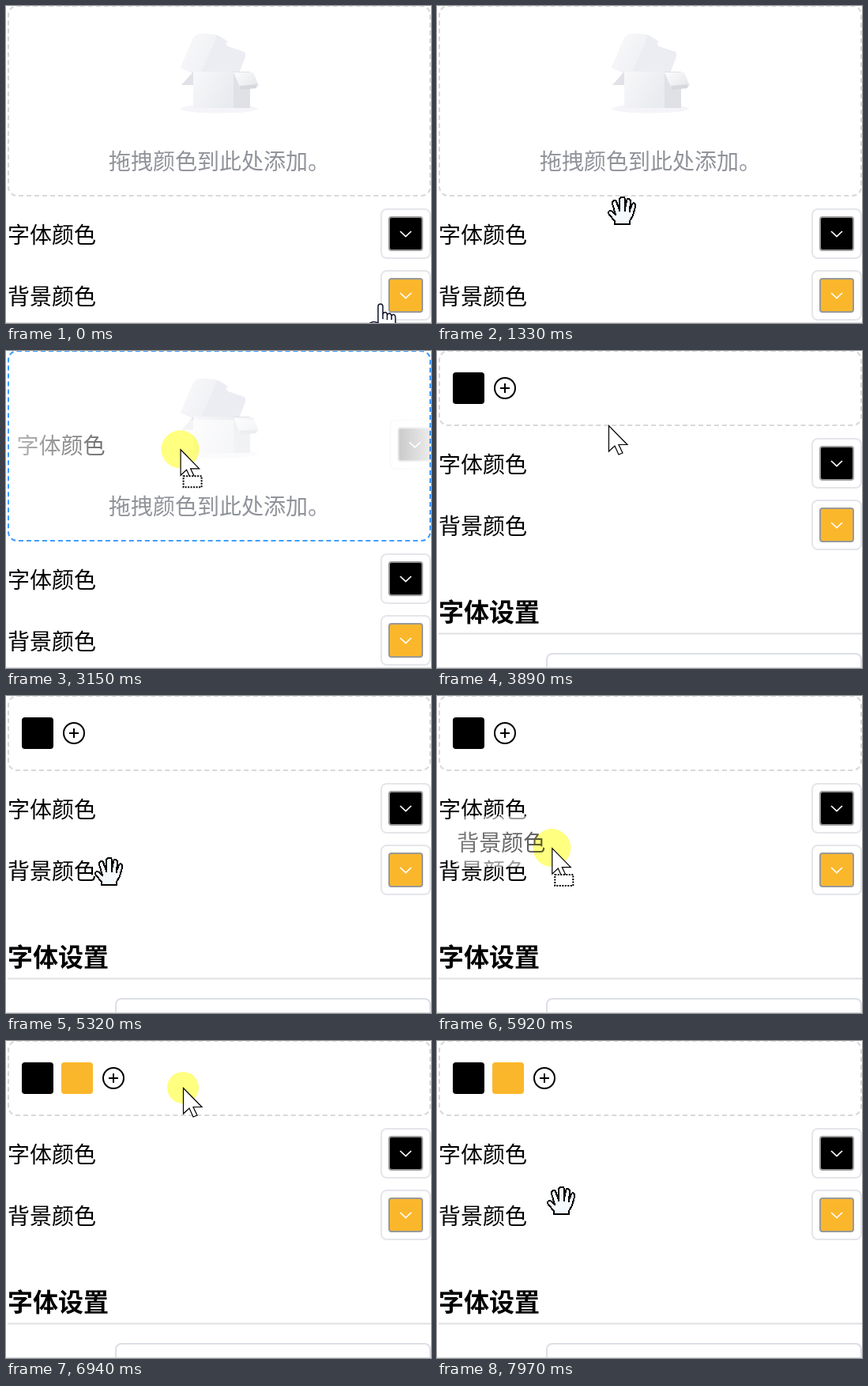
Recreate the animation shown at these times as an HTML page. Size 538 by 401 pixels, loop 8 s.

```html
<!DOCTYPE html>
<html lang="zh-CN">
<head>
<meta charset="utf-8">
<title>颜色拖拽</title>
<style>
html, body { margin: 0; width: 100%; height: 100%; overflow: hidden; background: #fff; }
#zone {
  position: absolute; left: 2px; top: -1px; width: 536px; height: 242px;
  box-sizing: border-box; border: 2px dashed #d9d9d9; border-radius: 12px;
}
svg { position: absolute; left: 0; top: 0; display: block; }
text { font: 28px "Noto Sans CJK SC", "Noto Sans CJK", sans-serif; }
</style>
</head>
<body>
<div id="zone"></div>
<svg id="stage" width="538" height="401" viewBox="0 0 538 401"></svg>
<script>
const YELLOW = '#fbb72c';
const $ = id => document.getElementById(id);

const row = (id, label, color) => `
  <g id="${id}">
    <text x="2" y="44">${label}</text>
    <rect x="475" y="1" width="62" height="62" rx="7" fill="#fff" stroke="#e4e6ea" stroke-width="2"/>
    <rect x="485" y="11" width="42" height="42" rx="3" fill="${color}" stroke="#999" stroke-width="2"/>
    <path d="M499 29l7 6.5 7-6.5" fill="none" stroke="#fff" stroke-width="1.7"/>
  </g>`;

const fade = (id, from, to, slope = 0) => `
  <linearGradient id="${id}" x2="1" y2="${slope}">
    <stop stop-color="${from}"/><stop offset="1" stop-color="${to}"/>
  </linearGradient>`;

const stops = [[0, .66], [.3, .55], [.6, .3], [.82, .2], [1, 0]]
  .map(([o, a]) => `<stop offset="${o}" stop-color="#fff" stop-opacity="${a}"/>`).join('');

$('stage').innerHTML = `
  <defs>
    ${row('row0', '字体颜色', '#000')}
    ${row('row1', '背景颜色', YELLOW)}
    ${fade('lidL', '#fafafb', '#eff0f4', .6)}
    ${fade('front', '#f8f8fa', '#e9ebef', .5)}
    ${fade('flap', '#fcfcfd', '#e6e7eb', .8)}
    <radialGradient id="glow" gradientUnits="userSpaceOnUse" r="340">${stops}</radialGradient>
    <mask id="veil" maskUnits="userSpaceOnUse" x="0" y="0" width="538" height="64">
      <rect width="538" height="64" fill="url(#glow)"/>
    </mask>
  </defs>
  <g id="empty">
    <ellipse cx="270" cy="130" rx="49" ry="5.5" fill="#f5f5f9"/>
    <path d="M221 78L236 43Q239 36 246 35L264 36Q270 37 281 45L279 50L302 58Q304 62 302 67L295 85H237Z" fill="#ebedf2"/>
    <path d="M221 78L236 43Q239 36 246 35L264 36Q268 37 265 43L247 84H237Z" fill="url(#lidL)"/>
    <path d="M278 45L302 58L281 51Z" fill="#fff"/>
    <path d="M222 100L237 83V100Z" fill="#e1e2e8"/>
    <path d="M237 83H289V129H237Z" fill="url(#front)"/>
    <path d="M288 83H309V129H288Z" fill="#dfe1e6"/>
    <path d="M288 84H313L320 101L297 105Z" fill="url(#flap)"/>
    <path d="M296 101L318 99L317 104L297 106Z" fill="#d6d8dd"/>
    <text x="130" y="207" fill="#909399">拖拽颜色到此处添加。</text>
  </g>
  <g id="colors">
    <rect x="20" y="27" width="40" height="40" rx="4"/>
    <rect id="second" x="70" y="27" width="40" height="40" rx="4" fill="${YELLOW}"/>
    <g id="plus" fill="none" stroke="#000" stroke-width="2">
      <circle r="13"/><path d="M-6 0H6M0-6V6"/>
    </g>
  </g>
  <g id="list">
    <use href="#row0" y="256"/>
    <use href="#row1" y="334"/>
    <text x="2" y="488" style="font-size:32px;font-weight:700">字体设置</text>
    <path d="M2 503.5H538" stroke="#dfe0e4" stroke-width="2"/>
    <rect x="139" y="529" width="398" height="60" rx="7" fill="#fff" stroke="#dcdfe6" stroke-width="2"/>
  </g>
  <path d="M0 400.5H538" stroke="#d9d9dc"/>
  <g id="ghost"><g mask="url(#veil)">
    <rect width="538" height="64" fill="#fff"/><use id="ghostRow"/>
  </g></g>
  <g id="cursor">
    <circle id="spot" fill="#ffff80" style="mix-blend-mode:multiply"/>
    <g id="arrow">
      <path d="M.5 .5V33L8 26L13 37L18 35L13 24.5H24Z" fill="#fff" stroke="#000" stroke-width="1.2"/>
      <rect id="parcel" x="4" y="34" width="23" height="14" fill="#fff" stroke="#000" stroke-width="2" stroke-dasharray="2 1.5"/>
    </g>
    <path id="hand" fill="#f3f9fd" stroke="#000" stroke-width="2" stroke-linejoin="round" shape-rendering="crispEdges"
      d="M-9 17V13L-16 5Q-18 1 -15 0Q-12 0 -8 5L-12 -9Q-12 -13 -9 -13Q-7 -13 -6 -9L-3 -1V-14Q-3 -17 0 -17H2Q4 -17 4 -14V-2L6 -13Q7 -16 9 -15Q11 -14 11 -11L10 -1L13 -8Q14 -11 16 -9Q18 -8 17 -5L14 6L10 13V17Z
      M-3 -1V1M4 -2V1M10 -1V2"/>
    <path id="finger" fill="#fff" stroke="#10102c" stroke-width="1.5"
      d="M-3 24V3Q-3 0 0 0Q3 0 3 3V19M3 13Q4 10 6.500 10.500Q8.500 11 8.500 14V20M8.500 14Q10 11 12 12Q14 13 14 15V20M14 15Q16 12 18 14Q19 15 19 18V30H-4L-13 24Q-9 21 -3 24"/>
    <g id="banned" fill="none" stroke="#6e6c00" stroke-width="6">
      <circle r="17"/><path d="M-12-12L12 12"/>
    </g>
  </g>`;

// Pointer path: time, x, y
const path = [
  [0, 474, 377], [70, 474, 377], [350, 444, 338], [630, 384, 272], [840, 336, 256],
  [910, 336, 256], [1120, 280, 252], [1330, 234, 259], [1610, 209, 294], [1740, 209, 283],
  [2200, 214, 273], [2500, 222, 262], [2560, 226, 243], [2630, 229, 233], [3000, 223, 148],
  [3360, 217, 94], [4620, 217, 94], [5000, 182, 158], [5320, 130, 222], [5390, 122, 229],
  [5520, 122, 227], [5900, 148, 188], [6130, 178, 143], [6270, 199, 106], [6340, 203, 94],
  [6480, 214, 72], [6680, 224, 59], [7340, 224, 59], [7650, 190, 138], [7970, 157, 202], [8000, 157, 202]
];
const drags = [
  { start: 1740, drop: 3490, rest: 3890, enter: 2560, x: 209, y: 294, top: 256 },
  { start: 5520, drop: 6940, rest: 7340, enter: 6400, x: 122, y: 228, top: 188 }
];
const beats = [0, 1740, 2560, 3490, 3890, 4620, 5520, 6340, 6940, 7340];

const slope = (i, k) => (path[i + 1][k] - path[i][k]) / (path[i + 1][0] - path[i][0]);

// Monotone tangent, flat at turns and rests
function tangent(i, k) {
  if (i === 0 || i === path.length - 1) return 0;
  const a = slope(i - 1, k), b = slope(i, k);
  return a * b > 0 ? 2 * a * b / (a + b) : 0;
}

function at(t, k) {
  let i = 0;
  while (i < path.length - 2 && path[i + 1][0] <= t) i++;
  const [p, q] = [path[i], path[i + 1]];
  const h = q[0] - p[0], u = (t - p[0]) / h, v = 1 - u;
  return v * v * (1 + 2 * u) * p[k] + u * u * (3 - 2 * u) * q[k]
    + h * u * v * (v * tangent(i, k) - u * tangent(i + 1, k));
}

const show = (id, on) => $(id).style.display = on ? '' : 'none';
const move = (id, x, y) => $(id).setAttribute('transform', `translate(${x.toFixed(1)} ${y.toFixed(1)})`);
const set = (id, attrs) => Object.entries(attrs).forEach(([k, v]) => $(id).setAttribute(k, v));

function render(time) {
  const beat = beats.filter(b => b <= time).pop();
  const t = beat + Math.floor((time - beat) / 70) * 70;
  const x = at(t, 1), y = at(t, 2);
  const filled = t >= drags[0].drop, two = t >= drags[1].drop;
  const index = drags.findIndex(d => t >= d.start && t < d.rest);
  const drag = drags[index];
  const held = !!drag && t < drag.drop;
  const inside = held && t >= drag.enter;

  $('zone').style.height = filled ? '96px' : '242px';
  $('zone').style.borderColor = inside ? '#409eff' : '#d9d9d9';
  show('empty', !filled);
  show('colors', filled);
  show('second', two);
  move('plus', two ? 136 : 86, 47);
  move('list', 0, filled ? -146 : 0);

  show('ghost', held);
  if (held) {
    move('ghost', x - drag.x, drag.top + y - drag.y);
    set('ghostRow', { href: '#row' + index });
    set('glow', { cx: drag.x, cy: drag.y - drag.top });
  }

  const first = filled ? 110 : 256;
  const onRow = [first, first + 78].some(top => y >= top - 6 && y <= top + 66);
  const kind = drag
    ? (held && !inside && !onRow ? 'banned' : 'arrow')
    : onRow ? (x >= 474 ? 'finger' : 'hand') : 'arrow';
  ['arrow', 'hand', 'finger', 'banned'].forEach(id => show(id, id === kind));
  show('parcel', held);
  show('spot', !!drag);
  set('spot', { r: held ? 24 : 20 });
  move('cursor', x, y);
}

const begin = performance.now();
function tick() {
  render((performance.now() - begin) % 8000);
  requestAnimationFrame(tick);
}
tick();
</script>
</body>
</html>
```
